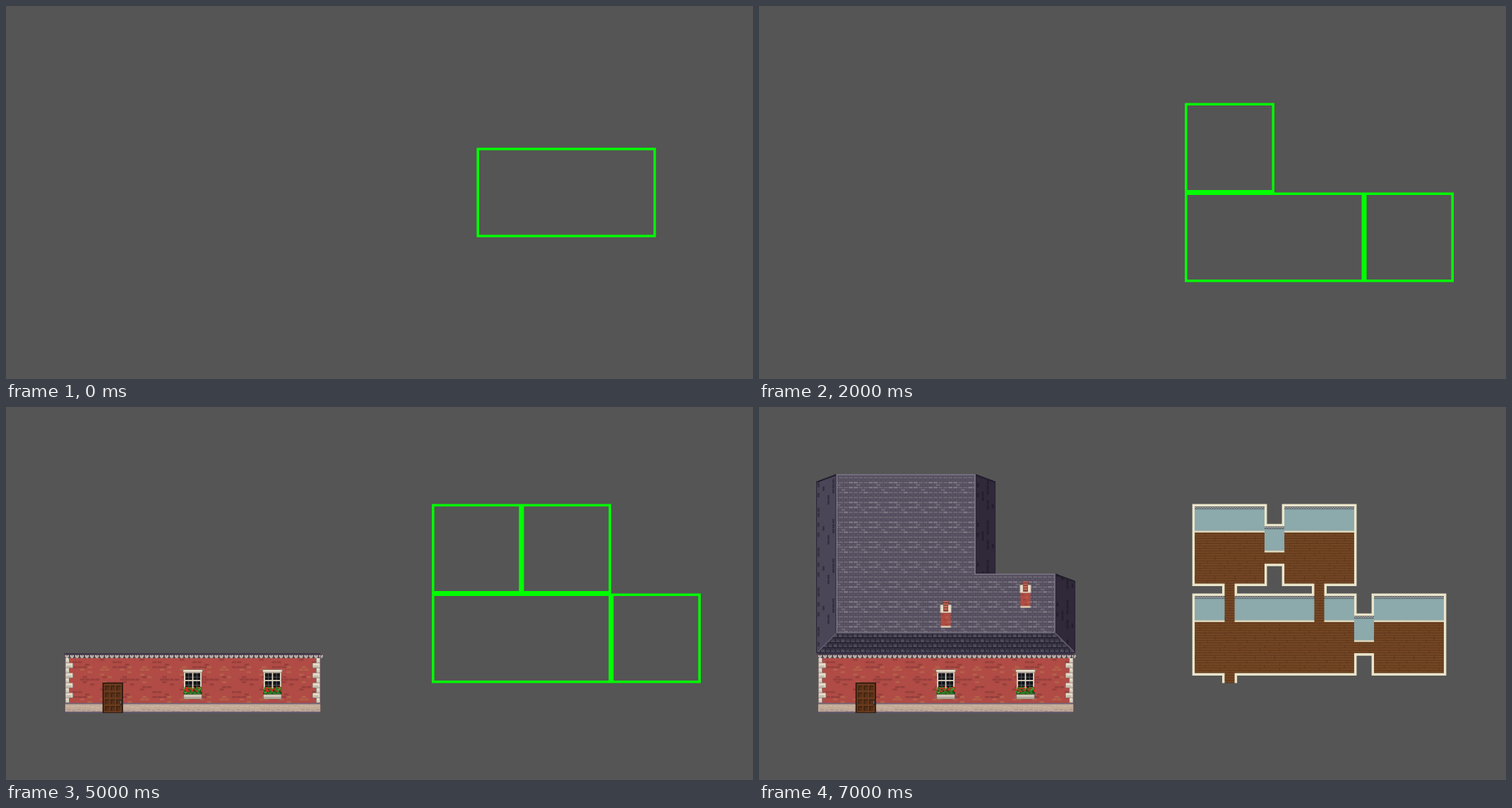
Animation of 1058x529 px, one loop 8000 ms. Source, as an HTML page with a canvas:

```html
<!DOCTYPE html>
<html lang="en">
<head>
<meta charset="utf-8">
<title>House builder</title>
<style>
html, body { margin: 0; width: 100%; height: 100%; overflow: hidden; background: #555; }
canvas { display: block; width: 1058px; height: 529px; }
</style>
</head>
<body>
<canvas id="stage" width="1200" height="600"></canvas>
<script>
const ctx = document.getElementById('stage').getContext('2d');

// One tile is 16 units; the stage is 75 x 37.5 tiles.
const hash = (a, b) => {
  const v = Math.sin(a * 127.1 + b * 311.7) * 43758.5453;
  return v - Math.floor(v);
};
const box = (x, y, w, h, color) => {
  ctx.fillStyle = color;
  ctx.fillRect(x, y, w, h);
};
const poly = pts => {
  ctx.beginPath();
  pts.forEach(([x, y]) => ctx.lineTo(x, y));
  ctx.closePath();
};
const clipped = (pts, paint) => {
  ctx.save();
  poly(pts);
  ctx.clip();
  paint();
  ctx.restore();
};
const line = (pts, color, width = 2) => {
  ctx.beginPath();
  pts.forEach(([x, y]) => ctx.lineTo(x, y));
  ctx.strokeStyle = color;
  ctx.lineWidth = width;
  ctx.stroke();
};

function plan(x, y, w = 144) {
  ctx.strokeStyle = '#00ff00';
  ctx.lineWidth = 4;
  ctx.strokeRect(x + 2, y + 2, w - 4, 140);
}

// Pale and dull courses alternate, so the rows read as horizontal bands.
function slates(x, y, w, h) {
  box(x, y, w, h, '#4f485a');
  for (let r = 0; r * 4 < h; r++) {
    const shift = (r % 2) * 4;
    for (let c = -1; c * 8 < w; c++) {
      const k = hash((c + 8) % 4 + 2, r % 8);
      const color = r % 2
        ? (k < .5 ? '#7d7682' : '#6b6471')
        : (k < .3 ? '#6f6875' : '#5b5465');
      const left = Math.max(x, x + c * 8 + shift);
      const right = Math.min(x + w, x + c * 8 + shift + 7);
      if (right > left) box(left, y + r * 4, right - left, 3, color);
    }
  }
}

function slope(pts, base, speck, seed) {
  clipped(pts, () => {
    const [x, y] = pts[0];
    box(x, 90, 34, 310, base);
    for (let r = 0; r < 38; r++) {
      for (let c = 0; c < 4; c++) {
        if (hash(c + seed, r % 8) < .4) {
          box(x + c * 8 + 2, 98 + r * 8 - c * 2, 3, 7, speck);
        }
      }
    }
    line([pts[0], pts[1]], '#1c1825', 4);
    poly(pts);
    ctx.strokeStyle = '#262031';
    ctx.lineWidth = 2;
    ctx.stroke();
  });
}

function chimney(x, y) {
  box(x + 4, y, 10, 8, '#7d3c34');
  box(x + 5, y, 8, 2, '#c46455');
  box(x + 5, y + 4, 8, 2, '#c9695a');
  box(x, y + 6, 18, 13, '#c9bba8');
  box(x + 1, y + 7, 16, 11, '#e8dcc8');
  box(x + 5, y + 6, 8, 11, '#8a453b');
  box(x + 6, y + 8, 6, 2, '#d07860');
  box(x + 6, y + 12, 6, 2, '#d07860');
  box(x + 1, y + 19, 16, 22, '#b04d43');
  for (let r = 0; r < 5; r++) {
    box(x + 2 + (r * 7) % 11, y + 21 + r * 4, 4, 2, r % 2 ? '#bd6450' : '#9a413a');
  }
  box(x + 1, y + 40, 16, 3, '#d8c6ab');
}

function roof() {
  slope([[92, 120], [124, 108], [124, 364], [92, 396]], '#4a4557', '#35303f', 1);
  slope([[348, 108], [380, 120], [380, 268], [348, 268]], '#302939', '#241e2c', 5);
  slope([[476, 268], [508, 280], [508, 396], [476, 364]], '#302939', '#241e2c', 5);
  slates(124, 108, 224, 160);
  slates(124, 268, 352, 96);
  line([[125, 363], [125, 109], [347, 109], [347, 269], [475, 269], [475, 363]], '#777181');
  line([[124, 363], [476, 363]], '#6c6676');

  const front = [[124, 364], [476, 364], [508, 396], [92, 396]];
  clipped(front, () => {
    box(92, 364, 416, 32, '#383343');
    for (let r = 0; r < 4; r++) {
      const y = 364 + r * 8;
      box(92, y + 6, 416, 2, '#272230');
      for (let c = 0; c < 53; c++) {
        const x = 88 + c * 8 + (r % 2) * 4;
        box(x, y + 5, 6, 1, '#625d6c');
        box(x, y + 2, 5, 3, hash(c % 4, r) < .45 ? '#4f495a' : '#413c4b');
        box(x + 6, y, 1, 6, '#2a2533');
      }
    }
  });
  line([[124, 364], [93, 395]], '#625d6d');
  line([[476, 364], [507, 395]], '#625d6d');
  box(92, 394, 416, 2, '#302b3b');

  chimney(291, 312);
  chimney(419, 280);
}

function cornerStone(side, row) {
  const w = row % 2 ? 13 : 7, x = side ? 505 - w : 95, y = 404 + row * 8;
  box(x, y, w, 8, '#857777');
  box(x + 1, y, w - 2, 7, '#e3dcca');
  box(x + 2, y + 4, w - 5, 2, '#bdb8a2');
}

function door() {
  box(155, 443, 33, 49, '#2c170d');
  box(157, 445, 29, 46, '#6a3b1d');
  for (let r = 0; r < 4; r++) {
    for (let c = 0; c < 3; c++) {
      const x = 159 + c * 9, y = 448 + r * 11;
      box(x, y, 7, 8, '#432411');
      box(x + 2, y + 2, 5, 6, '#57301a');
    }
  }
  box(184, 471, 3, 9, '#25272d');
  box(184, 473, 1, 4, '#89909a');
}

function houseWindow(x) {
  box(x, 422, 32, 6, '#8b7c73');
  box(x + 1, 423, 30, 3, '#eee3cf');
  box(x + 2, 427, 28, 28, '#e0d5c0');
  for (let c = 0; c < 2; c++) {
    const left = x + 4 + c * 13;
    box(left, 428, 11, 27, '#11141a');
    box(left + 5, 428, 1, 27, '#5f5c58');
    box(left, 434, 11, 1, '#5f5c58');
    box(left, 439, 11, 2, '#d5cab7');
    box(left, 447, 11, 1, '#5f5c58');
  }
  box(x + 1, 461, 30, 9, '#77706a');
  box(x + 2, 463, 28, 6, '#d8cdbb');
  box(x + 2, 466, 28, 2, '#aaa398');
  for (let c = 0; c < 15; c++) {
    for (let r = 0; r < 6; r++) {
      const k = hash(c + 4, r + 9);
      const color = r < 4 && k < .34 ? '#d52a20' : k < .67 ? '#2f7a25' : k < .86 ? '#194a1b' : '#69a432';
      if (r || k < .55) box(x + 1 + c * 2, 450 + r * 2, 2, 2, color);
    }
  }
}

function walls() {
  box(94, 396, 412, 96, '#b04b45');
  for (let r = 0; r < 18; r++) {
    for (let c = 0; c < 51; c++) {
      const k = hash(c % 8 + 3, r % 12 + 2);
      if (k < .25) box(95 + c * 8 + (r % 2) * 4, 405 + r * 4, 7, 3, k < .14 ? '#963f3c' : '#b4624a');
    }
  }
  box(94, 396, 412, 8, '#51434e');
  box(93, 396, 413, 2, '#3b3548');
  for (let x = 95; x < 505; x += 8) {
    box(x, 399, 6, 3, '#c9c1b6');
    box(x + 1, 402, 4, 2, '#b3aba2');
    box(x + 2, 399, 2, 2, '#837b82');
  }
  for (let row = 0; row < 9; row++) {
    cornerStone(0, row);
    cornerStone(1, row);
  }
  box(94, 476, 412, 16, '#c2aa97');
  box(94, 476, 412, 2, '#716477');
  for (let c = 0; c < 51; c++) {
    const x = 96 + c * 8, k = hash(c % 8, 4);
    box(x, 480 + k * 3, 6, 1, '#d4c0aa');
    box(x + 2, 486 + k * 3, 6, 2, '#aa958d');
  }
  box(94, 490, 412, 2, '#655b70');
  box(94, 396, 1, 96, '#5b4a54');
  box(505, 396, 1, 96, '#5b4a54');
  door();
  houseWindow(284);
  houseWindow(412);
}

const CREAM = '#eae5ca';

function floorArea(x, y, w, h) {
  box(x, y, w, h, '#744624');
  for (let top = y; top < y + h; top += 4) {
    box(x, top + 3, w, 1, '#59351a');
    for (let c = 0; c * 32 < w; c++) {
      const joint = x + c * 32 + Math.floor(hash(top / 4 % 8, 3) * 8) * 4;
      if (joint < x + w) box(joint, top, 1, 3, '#5c371b');
    }
  }
}

function indoorWall(x, y, w) {
  box(x, y, w, 39, '#8ca9ab');
  box(x, y, w, 4, '#5f636b');
  for (let c = 0; c < w; c += 4) {
    box(x + c, y + 1, 2, 1, '#c6c7bc');
    box(x + c + 2, y + 2, 2, 1, '#b0b4ac');
  }
  box(x, y + 4, w, 1, '#779398');
  box(x, y + 39, w, 3, '#ddd6bb');
}

// x, y, width, height of the walkable insides
const rooms = [
  [700, 160, 112, 124], [844, 160, 112, 124],
  [700, 304, 256, 124], [988, 304, 112, 124],
  [812, 192, 32, 60], [956, 336, 32, 60]
];
const passages = [[748, 284, 64], [892, 284, 64], [748, 428, 16]];

function interior() {
  for (const [x, y, w, h] of rooms) box(x - 4, y - 4, w + 8, h + 8, CREAM);
  for (const [x, y, h] of passages) box(x - 4, y, 24, Math.min(h, 20), CREAM);
  for (const [x, y, w, h] of rooms) {
    floorArea(x, y, w, h);
    indoorWall(x, y, w);
  }
  for (const [x, y, h] of passages) floorArea(x, y, 16, h);
}

const base = () => {
  plan(684, 300, 288);
  plan(972, 300);
  plan(684, 156);
};
const fullPlan = () => {
  base();
  plan(828, 156);
};
const lowRoof = () => {
  ctx.save();
  ctx.translate(0, 96);
  roof();
  ctx.restore();
};
const house = () => {
  walls();
  roof();
};

const steps = [
  () => plan(756, 228, 288),
  () => { plan(684, 228, 288); plan(972, 228); },
  base,
  fullPlan,
  () => { fullPlan(); lowRoof(); },
  () => { fullPlan(); walls(); },
  () => { fullPlan(); house(); },
  () => { house(); interior(); }
];

const start = performance.now();
let shown = -1;
function tick(now) {
  const step = Math.floor(Math.max(0, now - start) / 1000) % steps.length;
  if (step !== shown) {
    shown = step;
    box(0, 0, 1200, 600, '#555555');
    steps[step]();
  }
  requestAnimationFrame(tick);
}
tick(start);
</script>
</body>
</html>
```
